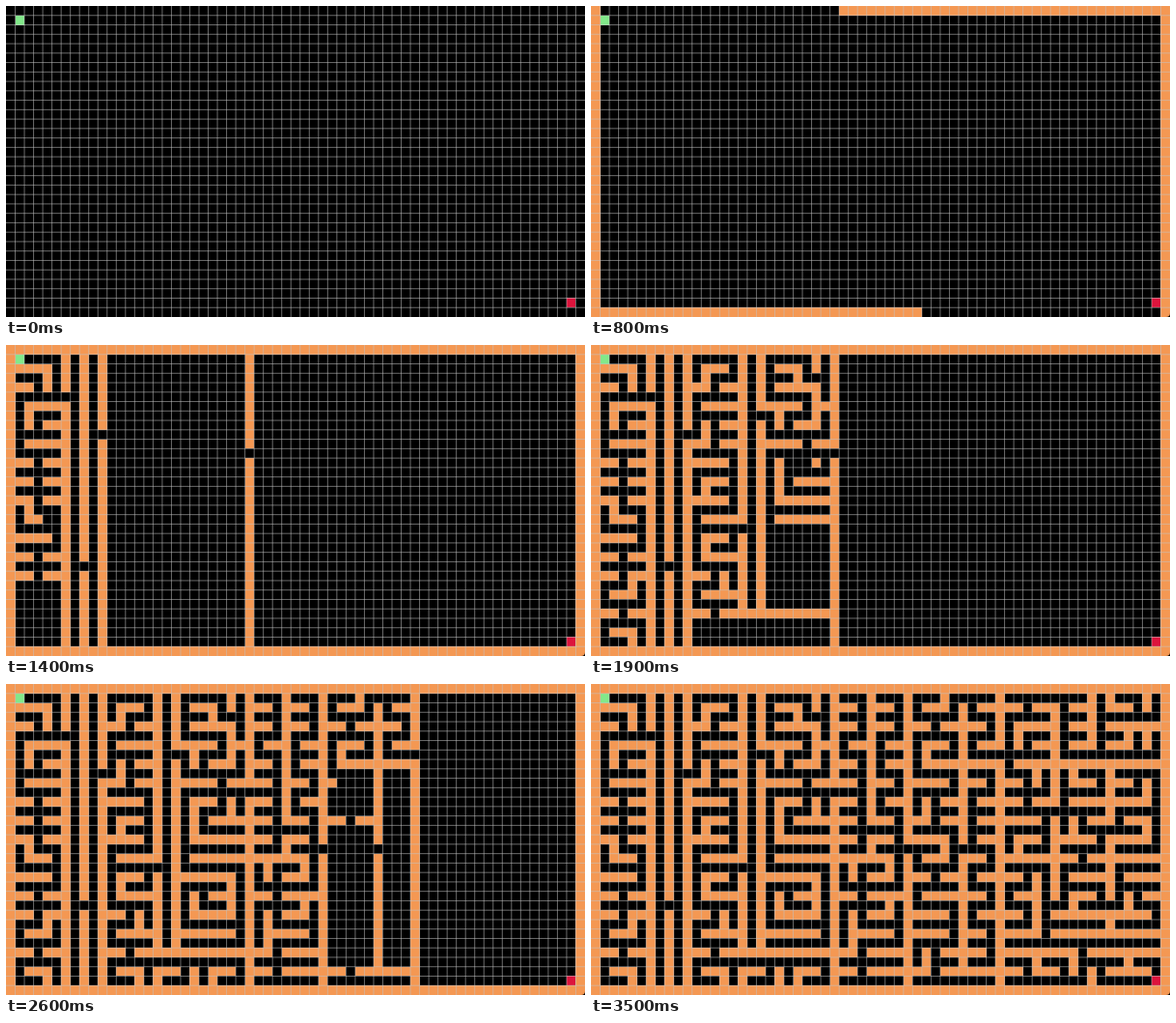
Animation, 600 px wide and 322 px high, one loop 3600 ms. Source, as an HTML page with a canvas:

```html
<!DOCTYPE html>
<html lang="en">
<head>
<meta charset="utf-8">
<title>Maze by recursive division</title>
<style>
  html, body { margin: 0; height: 100%; overflow: hidden; background: #000; }
  canvas { display: block; border-bottom-right-radius: 4px; }
</style>
</head>
<body>
<canvas id="stage" width="600" height="322"></canvas>
<script>
const ctx = document.getElementById("stage").getContext("2d");
const COLS = 63, ROWS = 33, LOOP = 3600, STEP = 100;
const W = 600 / COLS, H = 322 / ROWS;

// Divisions of the large rooms, depth first: wall * 100 + door,
// positive for a column, negative for a row. Small rooms are cut at random.
const mainCuts = [
  2611, 1009, 823, 605, -2403, -1603,
  -2813, 1807, 1619, -413, -1615, -1819, -1619,
  4407, 3417, -1833, 3015, -835, -3037, 4017,
  -1853, -845, 5407, 5615, -2853, -2649, 5623
];
const LARGE = 36;
const walls = [];

let seed = 7;
function random(n) {
  seed = seed * 16807 % 2147483647;
  return Math.floor(seed / 2147483647 * n);
}

// Two arms go round the frame from opposite corners.
function addFrame() {
  for (let i = 0; i < COLS + ROWS - 2; i++) {
    const c = Math.max(0, i - ROWS + 1), r = Math.min(i, ROWS - 1);
    walls.push([c, r], [COLS - 1 - c, ROWS - 1 - r]);
  }
}

function chooseCut(left, top, wide, high) {
  if (wide * high >= LARGE) {
    const cut = mainCuts.shift(), size = Math.abs(cut);
    return [cut < 0, Math.floor(size / 100), size % 100];
  }
  return high >= wide
    ? [true, top + 1 + 2 * random(high - 1), left + 2 * random(wide)]
    : [false, left + 1 + 2 * random(wide - 1), top + 2 * random(high)];
}

function divide(left, top, right, bottom) {
  if (left >= right || top >= bottom) return;
  const wide = (right - left) / 2 + 1, high = (bottom - top) / 2 + 1;
  const [isRow, at, door] = chooseCut(left, top, wide, high);
  if (isRow) {
    for (let c = left; c <= right; c++) if (c !== door) walls.push([c, at]);
    divide(left, top, right, at - 1);
    divide(left, at + 1, right, bottom);
  } else {
    for (let r = top; r <= bottom; r++) if (r !== door) walls.push([at, r]);
    divide(left, top, at - 1, bottom);
    divide(at + 1, top, right, bottom);
  }
}

function cell(c, r, color) {
  const x = Math.round(c * W), y = Math.round(r * H);
  ctx.fillStyle = color;
  ctx.fillRect(x, y, Math.round((c + 1) * W) - x, Math.round((r + 1) * H) - y);
}

function drawGrid() {
  ctx.fillStyle = "rgba(195,195,195,.55)";
  for (let c = 1; c < COLS; c++) ctx.fillRect(c * W - 0.5, 0, 1, 322);
  for (let r = 1; r < ROWS; r++) ctx.fillRect(0, r * H - 0.5, 600, 1);
}

function draw(time) {
  const step = Math.floor((time % LOOP) / STEP) - 4;
  const count = step > 0 ? Math.floor(36.5 * step - 10) : 0;
  ctx.fillStyle = "#000";
  ctx.fillRect(0, 0, 600, 322);
  for (const [c, r] of walls.slice(0, count)) cell(c, r, "#f49853");
  cell(1, 1, "#82e88a");
  cell(COLS - 2, ROWS - 2, "#dc143c");
  drawGrid();
}

addFrame();
divide(1, 1, COLS - 2, ROWS - 2);

const start = performance.now();
function tick() {
  draw(performance.now() - start);
  requestAnimationFrame(tick);
}
tick();
</script>
</body>
</html>
```
